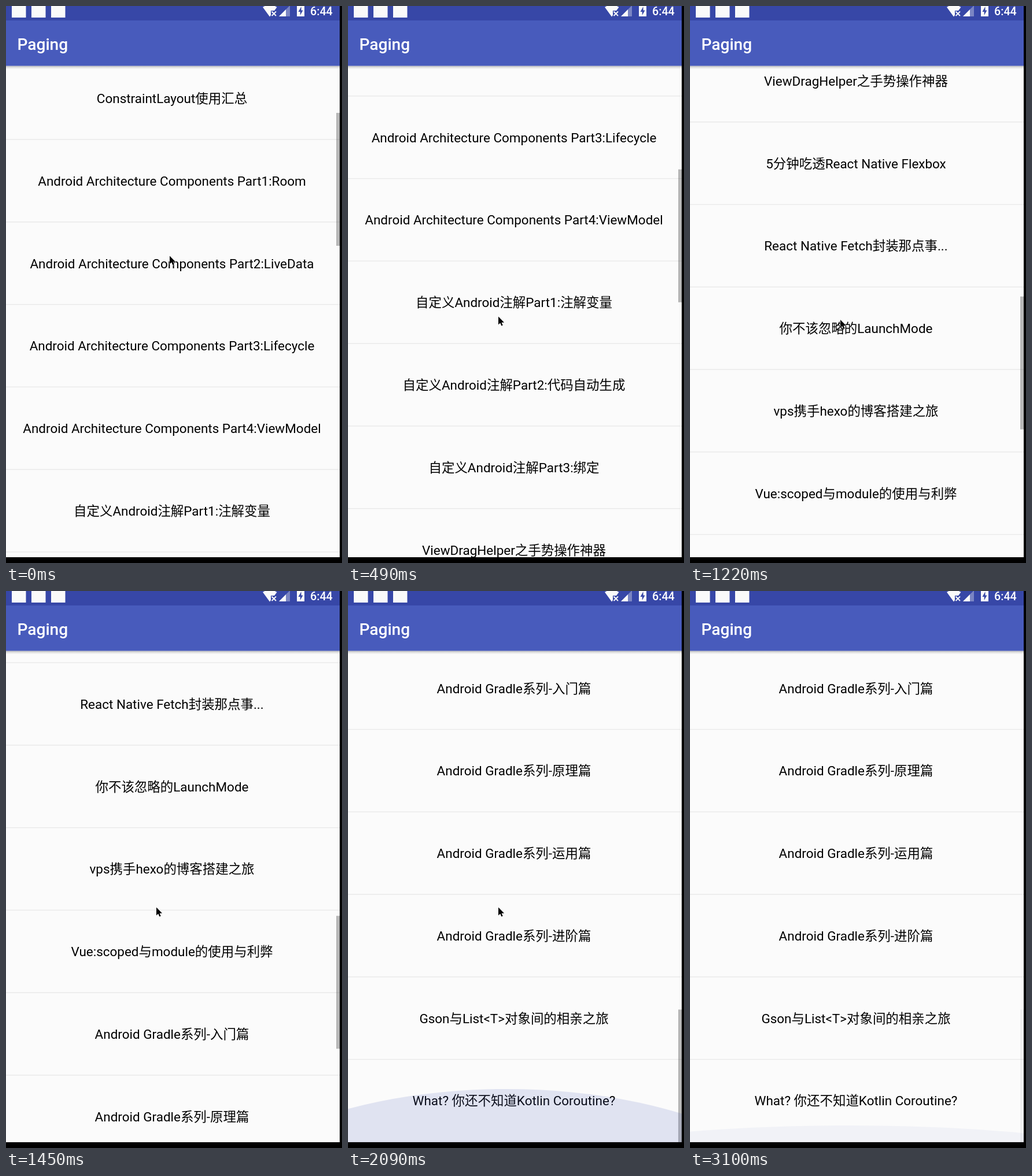
These frames come from a looping animation (581x964 px, 3.67 s). An HTML page:

```html
<!DOCTYPE html>
<html lang="zh-CN">
<head>
<meta charset="utf-8">
<title>Paging</title>
<style>
  html, body { margin: 0; width: 100%; height: 100%; overflow: hidden; background: #000; }
  svg { display: block; width: 581px; height: 964px; }
  text { font-family: Roboto, "Noto Sans CJK SC", "Noto Sans CJK", sans-serif; }
  .row text { font-size: 22.46px; text-anchor: middle; fill: #000; }
  .row rect { fill: #e9e9e9; }
  .bar { font-weight: 500; fill: #fff; }
</style>
</head>
<body>
<svg viewBox="0 0 581 964">
  <defs>
    <clipPath id="screen"><rect width="577" height="954"/></clipPath>
    <linearGradient id="shade" x2="0" y2="1">
      <stop stop-opacity=".27"/>
      <stop offset=".45" stop-opacity=".1"/>
      <stop offset="1" stop-opacity="0"/>
    </linearGradient>
  </defs>
  <rect width="581" height="964"/>
  <g clip-path="url(#screen)">
    <rect width="577" height="954" fill="#fbfbfb"/>
    <g id="list"></g>
    <rect id="thumb" x="571" width="6" height="230" fill-opacity=".27"/>
    <ellipse id="glow" cx="274" rx="577" fill="#3f51b5"/>
    <rect y="103.6" width="577" height="6" fill="url(#shade)"/>
    <rect width="577" height="103.6" fill="#485bbc"/>
    <rect width="577" height="25" fill="#3747a7"/>
    <g fill="#fafafa">
      <path d="M10 0h24.500v20h-24.500zM44 0h24.500v20h-24.500zM78 0h24.500v20h-24.500z"/>
      <path d="M444 2Q456 -6 468.500 2L464 8H458V16L456 18.500Z"/>
      <path d="M459.500 9.500L467 17M467 9.500L459.500 17" stroke="#fafafa" stroke-width="1.900"/>
      <path d="M491 -1V18H472Z" opacity=".35"/>
      <path d="M484 6V18H472Z"/>
      <path d="M503 -2H516V18H503Z"/>
      <path d="M510.500 1L505.500 10H508.700V16L513.500 7.500H510.500Z" fill="#3747a7"/>
    </g>
    <text class="bar" x="526" y="16" font-size="19.66">6:44</text>
    <text class="bar" x="19.500" y="75.500" font-size="28.08">Paging</text>
  </g>
  <path id="cursor" d="M0 0V14L3.200 11L5.400 16L7.700 15L5.500 10.200H10Z" stroke="#fff" stroke-width="1" paint-order="stroke"/>
</svg>
<script>
const LOOP = 3670, PITCH = 142.78, BOTTOM = 954;
const titles = [
  'ConstraintLayout使用汇总',
  ...['1:Room', '2:LiveData', '3:Lifecycle', '4:ViewModel'].map(s => 'Android Architecture Components Part' + s),
  ...['1:注解变量', '2:代码自动生成', '3:绑定'].map(s => '自定义Android注解Part' + s),
  'ViewDragHelper之手势操作神器',
  '5分钟吃透React Native Flexbox',
  'React Native Fetch封装那点事...',
  '你不该忽略的LaunchMode',
  'vps携手hexo的博客搭建之旅',
  'Vue:scoped与module的使用与利弊',
  ...['入门', '原理', '运用', '进阶'].map(s => `Android Gradle系列-${s}篇`),
  'Gson与List<T>对象间的相亲之旅',
  'What? 你还不知道Kotlin Coroutine?'
];

// [time, value...]: each value holds until the next time
const scrollKeys = [
  [0, 0], [50, 15], [200, 144], [340, 147], [490, 360.7], [600, 488], [840, 721.5],
  [980, 795], [1100, 982], [1220, 1172.5], [1390, 1357], [1450, 1392], [1600, 1562],
  [1710, 1713.4], [1890, 1893], [1950, 1934], [2090, 1990.4]
];
const cursorKeys = [
  [0, 283, 432.5], [200, 272, 482], [340, 262, 528], [490, 260, 537.5], [1100, 260, 543],
  [1390, 260, 547.5], [2240, 260, 549], [2390, 259, 590], [2500, 256, 690],
  [2610, 253, 820], [2720, 251, 940], [2830, 250, 1000]
];
const thumbKeys = [[0, 1], [2950, .7], [3025, .4], [3100, .16]];
const glowTimes = [[2090], [2240], [2390], [2500], [2610], [2720], [2830]];

const el = id => document.getElementById(id);
const list = el('list'), thumb = el('thumb'), glow = el('glow'), cursor = el('cursor');
const held = (keys, t) => keys.filter(k => k[0] <= t).pop();

function add(parent, tag, attrs, content = '') {
  const node = document.createElementNS('http://www.w3.org/2000/svg', tag);
  for (const name in attrs) node.setAttribute(name, attrs[name]);
  node.textContent = content;
  return parent.appendChild(node);
}

titles.forEach((title, i) => {
  const row = add(list, 'g', { class: 'row', transform: `translate(0 ${i * PITCH})` });
  add(row, 'text', { x: 287, y: 168 }, title);
  add(row, 'rect', { y: 230.3, width: 577, height: 1.4 });
});

function drawGlow(t) {
  const key = held(glowTimes, t);
  glow.setAttribute('visibility', key ? 'visible' : 'hidden');
  if (!key) return;
  const left = Math.pow(1 - Math.max(0, key[0] - 2240) / 590, 1.4);
  const rising = key[0] < 2240;
  const size = rising ? .495 : .156 + .42 * left;
  glow.setAttribute('ry', 577 * size);
  glow.setAttribute('cy', BOTTOM + (577 - 186) * size);
  glow.setAttribute('fill-opacity', rising ? .144 : .05 + .098 * left);
}

function draw(t) {
  const scroll = held(scrollKeys, t)[1];
  const [, x, y] = held(cursorKeys, t);
  list.setAttribute('transform', `translate(0 ${-scroll})`);
  thumb.setAttribute('y', 185 + scroll * .271);
  thumb.setAttribute('opacity', held(thumbKeys, t)[1]);
  cursor.setAttribute('transform', `translate(${x} ${y})`);
  drawGlow(t);
}

const start = performance.now();
function tick() {
  draw((performance.now() - start) % LOOP);
  requestAnimationFrame(tick);
}
tick();
</script>
</body>
</html>
```
